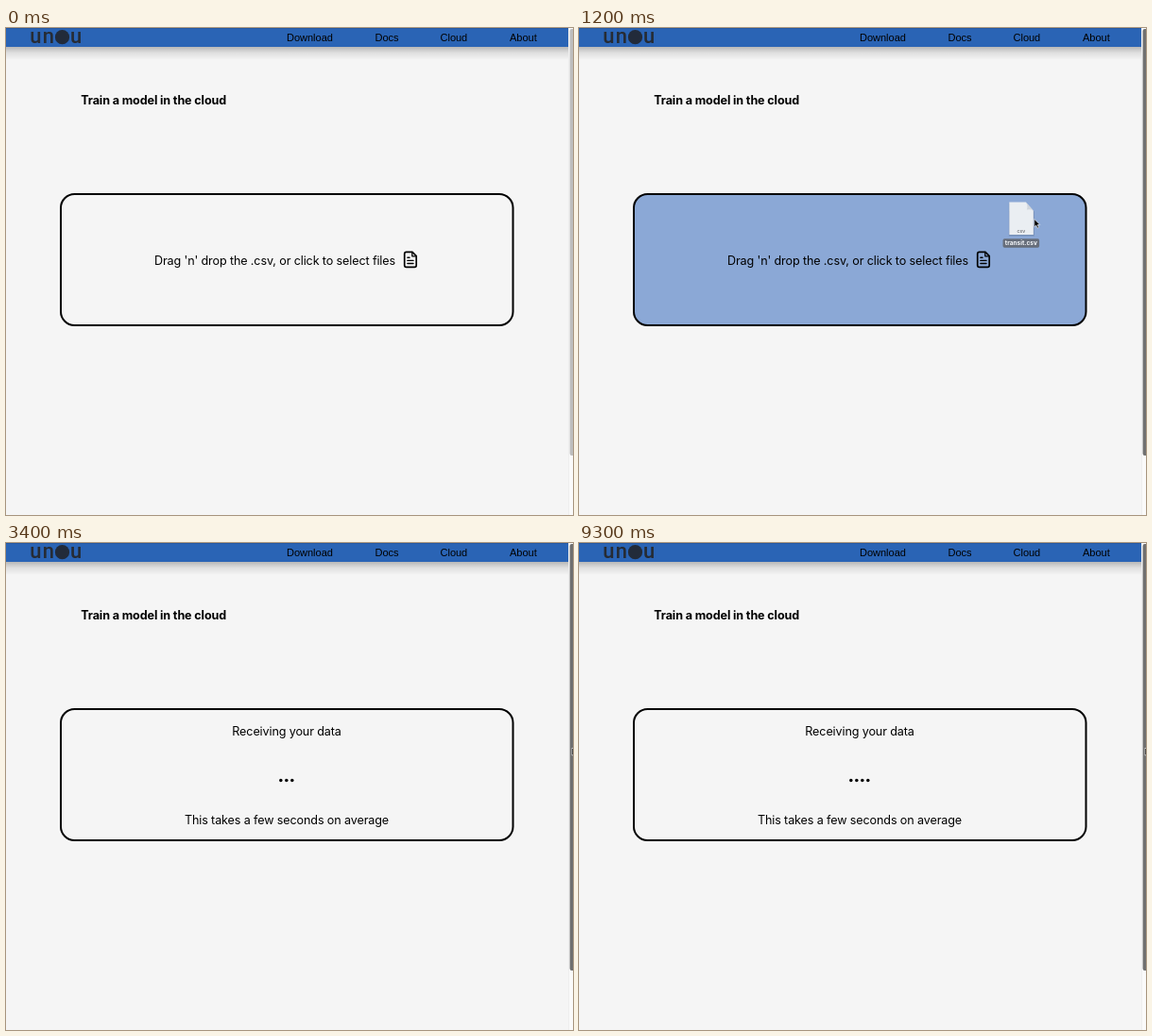
Recreate the animation shown at these times as an HTML page. Size 600x516 px, loop 10000 ms.

```html
<!DOCTYPE html>
<html lang="en">
<head>
<meta charset="utf-8">
<title>Cloud training upload</title>
<style>
  html, body { margin: 0; width: 100%; height: 100%; overflow: hidden; background: #f5f5f5; }
  svg { display: block; }
  .nav { font: 11px "Liberation Sans", Arial, sans-serif; }
  .copy { font: 12.6px Inter, sans-serif; letter-spacing: -.13px; }
  .bold { font-weight: 700; }
  .mid { text-anchor: middle; }
  .brand { font: 500 22px Roboto, sans-serif; fill: #262b33; }
  .label { font: 700 6.5px Inter, sans-serif; fill: #fff; }
  .kind { font: 600 4px Inter, sans-serif; fill: #666; }
</style>
</head>
<body>
<svg width="600" height="516" viewBox="0 0 600 516">
  <defs>
    <linearGradient id="shade" x2="0" y2="1">
      <stop offset="0" stop-color="#000" stop-opacity=".25"/>
      <stop offset=".45" stop-color="#000" stop-opacity=".09"/>
      <stop offset="1" stop-color="#000" stop-opacity="0"/>
    </linearGradient>
  </defs>
  <rect width="600" height="516" fill="#f5f5f5"/>

  <!-- header -->
  <rect y="20" width="595" height="14" fill="url(#shade)"/>
  <rect width="595" height="20" fill="#2a64b5"/>
  <rect width="595" height="1" fill="#2659a2"/>
  <text class="brand" x="25.2 38.7 68" y="16.3">unu</text>
  <circle cx="59.5" cy="9.7" r="7.6" fill="#222b3a"/>
  <g class="nav">
    <text x="297" y="14">Download</text>
    <text x="390.5" y="14">Docs</text>
    <text x="459.5" y="14">Cloud</text>
    <text x="533" y="14">About</text>
  </g>

  <text class="copy bold" x="79.3" y="81">Train a model in the cloud</text>

  <rect id="zone" x="58" y="176" width="478.5" height="139" rx="14.5" stroke="#000" stroke-width="2"/>
  <g id="prompt">
    <text class="copy" x="157" y="251">Drag 'n' drop the .csv, or click to select files</text>
    <g fill="none" stroke="#000" stroke-width="1.7" stroke-linejoin="round" stroke-linecap="round">
      <path d="M423.6 237.3H430L434.2 241.5V251.4Q434.2 253.3 432.3 253.3H423.6Q421.7 253.3 421.7 251.4V239.2Q421.7 237.3 423.6 237.3Z"/>
      <path d="M429.8 237.5V241.8H434" stroke-width="1.3"/>
      <path d="M424.9 243.3H427M424.9 246.4H431M424.9 249.5H431" stroke-width="1.4"/>
    </g>
  </g>
  <g id="progress" class="copy mid">
    <text x="297" y="203.5">Receiving your data</text>
    <g id="dots"></g>
    <text x="297" y="297.5">This takes a few seconds on average</text>
  </g>

  <!-- scrollbar -->
  <rect x="595" width="5" height="516" fill="#fafafa"/>
  <rect x="595" width=".6" height="516" fill="#e6e6e6"/>
  <rect id="thumb" x="596.6" y="1" width="5" height="452" rx="2"/>

  <!-- dragged file, origin at the top centre of the page -->
  <g id="file" opacity=".92">
    <path d="M-13 1H6L14 10V36H-13Z" fill="#000" opacity=".15"/>
    <path d="M-12.5 0H5L13 9V34.5H-12.5Z" fill="#f3f4f5"/>
    <path d="M5 0Q7.5 4 6 8Q10 7 13 9Z" fill="#d6dade"/>
    <text class="kind mid" y="32">CSV</text>
    <rect x="-19.3" y="38.8" width="38.6" height="9.4" rx="1.8" fill="#636973"/>
    <text class="label mid" y="45.8">transit.csv</text>
  </g>
  <path id="cursor" d="M0 0V8.2L1.9 6.5L3.2 9.5L4.7 8.9L3.4 6H6Z" fill="#000" stroke="#fff" stroke-width=".6"/>
</svg>
<script>
const LOOP = 10000, ENTER = 400, OVER = 450, DROP = 1230, FADE = 130;
const cursorPath = [[400, 602, 180], [460, 511, 191], [600, 490, 194.5], [860, 479.5, 196.5],
  [1230, 482, 203], [1660, 482, 203], [1800, 500, 205], [2100, 575, 213.5], [2260, 594, 216], [2660, 599, 217]];
const filePath = [[400, 594, 161], [460, 503, 172], [600, 480, 176], [860, 466, 178.7], [1230, 468, 185]];

const el = id => document.getElementById(id);
const clamp = v => Math.min(1, Math.max(0, v));
const ramp = (t, start) => clamp((t - start) / FADE);
const show = (id, on) => el(id).setAttribute("visibility", on ? "visible" : "hidden");

function along(path, t) {
  const next = path.findIndex(p => p[0] > t);
  if (next < 0) return path[path.length - 1].slice(1);
  if (next === 0) return path[0].slice(1);
  const [t0, x0, y0] = path[next - 1], [t1, x1, y1] = path[next];
  const k = (t - t0) / (t1 - t0);
  return [x0 + (x1 - x0) * k, y0 + (y1 - y0) * k];
}

const move = (id, path, t) => el(id).setAttribute("transform", `translate(${along(path, t)})`);

function drawDots(t) {
  const count = Math.max(0, Math.floor((t - 1260) / 1000)) % 5 + 1;
  el("dots").innerHTML = Array.from({ length: count }, (_, i) =>
    `<circle cx="${296.8 + (i - (count - 1) / 2) * 6}" cy="251.6" r="1.75"/>`).join("");
}

function draw(t) {
  const dropped = t >= DROP;
  el("zone").setAttribute("fill", t >= OVER && !dropped ? "#8ba8d6" : "#f5f5f5");
  show("prompt", !dropped);
  show("progress", dropped);
  show("file", t >= ENTER && !dropped);
  show("cursor", t >= ENTER);
  move("file", filePath, t);
  move("cursor", cursorPath, t);
  drawDots(t);

  const hover = ramp(t, ENTER) - ramp(t, 1200) + ramp(t, 2300);
  const grey = Math.round(190 - 78 * hover);
  el("thumb").setAttribute("fill", `rgb(${grey},${grey},${grey})`);
}

const start = performance.now();
function tick() {
  draw((performance.now() - start) % LOOP);
  requestAnimationFrame(tick);
}
tick();
</script>
</body>
</html>
```
